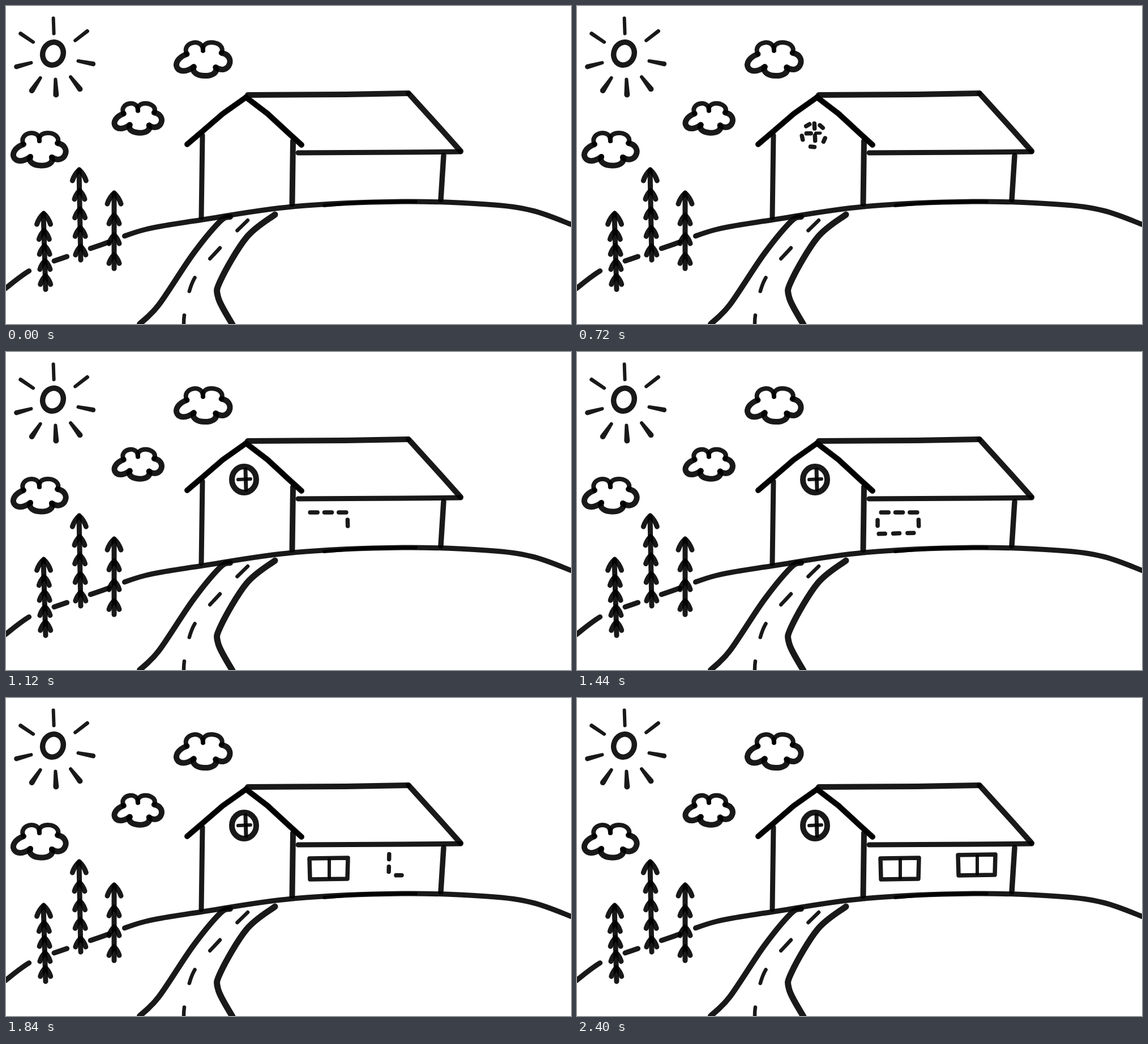
Write an HTML page that moves like this. It is 998 px wide and 561 px high and loops after 2500 ms.

```html
<!DOCTYPE html>
<html lang="en">
<head>
<meta charset="utf-8">
<title>Barn sketch</title>
<style>
  html, body { margin: 0; width: 100%; height: 100%; overflow: hidden; background: #fff; }
  svg { display: block; width: 998px; height: 561px; }
  path, ellipse { fill: none; stroke: #000; stroke-opacity: .9; stroke-linecap: round; stroke-linejoin: round; }
</style>
</head>
<body>
<svg id="stage" viewBox="0 0 998 561"></svg>
<script>
const LOOP = 2500, STEP = 80, LAST = 30, PHASE = 10;
const BOLD = 10, MID = 8.5, FINE = 6.5;
const stage = document.getElementById('stage');

function add(tag, attrs, parent = stage) {
  const el = document.createElementNS('http://www.w3.org/2000/svg', tag);
  for (const k in attrs) el.setAttribute(k, attrs[k]);
  return parent.appendChild(el);
}

const line = (w, d, parent) => add('path', { d, 'stroke-width': w }, parent);

const ring = (w, cx, cy, rx, ry, turn, parent) => add('ellipse',
  { cx, cy, rx, ry, 'stroke-width': w, transform: `rotate(${turn} ${cx} ${cy})` }, parent);

// Smooth stroke through a few points, optionally broken into dashes
function curve(w, text, dashes = 'none') {
  const p = text.split(' ').map(s => s.split(',').map(Number));
  let d = `M${p[0]}`;
  for (let i = 0; i < p.length - 1; i++) {
    const a = p[i - 1] || p[i], b = p[i], c = p[i + 1], e = p[i + 2] || c;
    const c1 = b.map((v, k) => v + (c[k] - a[k]) / 6);
    const c2 = c.map((v, k) => v - (e[k] - b[k]) / 6);
    d += `C${c1} ${c2} ${c}`;
  }
  line(w, d).setAttribute('stroke-dasharray', dashes);
}

function sun() {
  ring(9.5, 83, 84, 18, 20.5, 20);
  for (let i = 0; i < 8; i++) {
    const deg = i * 45 - 92 + 13 * Math.cos((i - 2) * Math.PI / 4);
    const a = deg * Math.PI / 180, reach = 6 * Math.abs(Math.sin(2 * a));
    const r1 = 3, r2 = 4 + Math.sin(a);
    const x1 = 40 + reach, x2 = 67 + reach;
    add('path', {
      d: `M${x1} ${r1}A${r1} ${r1} 0 0 1 ${x1} ${-r1}L${x2} ${-r2}A${r2} ${r2} 0 0 1 ${x2} ${r2}Z`,
      transform: `translate(86 89) rotate(${deg})`,
      style: 'fill:#000;fill-opacity:.9;stroke:none'
    });
  }
}

// Five lobes; each entry is a corner and the depth of the lobe after it
function cloud(x, y, scale) {
  const lobes = [[-28, -9, 17], [0, -15, 16], [32, -11, 20], [22, 14, 15], [-16, 13, 26]];
  lobes.forEach(([ax, ay, depth], i) => {
    const [bx, by] = lobes[(i + 1) % lobes.length];
    const dx = bx - ax, dy = by - ay, h = depth / .75 / Math.hypot(dx, dy);
    const at = (px, py) => `${x + px * scale} ${y + py * scale}`;
    line(i < 2 ? 8 : BOLD, `M${at(ax, ay)}C${at(ax + dy * h - dx * .2, ay - dx * h - dy * .2)} ` +
      `${at(bx + dy * h + dx * .2, by - dx * h + dy * .2)} ${at(bx, by)}`);
  });
}

function tree(x1, top, x2, bottom, rows) {
  line(9, `M${x1} ${top}L${x2} ${bottom}`);
  const first = top + 18, last = bottom - 9;
  for (let i = 0; i < rows; i++) {
    const y = first + (last - first) * i / (rows - 1);
    const x = x1 + (x2 - x1) * (y - top) / (bottom - top);
    const s = i ? 9 : 12, h = i ? 15 : 19;
    line(9, `M${x - s} ${y}Q${x - s * .7} ${y - h * .6} ${x} ${y - h}Q${x + s * .7} ${y - h * .6} ${x + s} ${y}`);
  }
}

sun();
cloud(59, 253, 1);
cloud(348, 94, 1.02);
cloud(233, 198, .9);
tree(66, 367, 70, 500, 5);
tree(129, 290, 132, 448, 5);
tree(191, 331, 191, 463, 4);

// Hill, broken up behind the trees
curve(9, '-2,499 45,465 99,445 169,421 247,394 347,377 506,354 700,345 850,350 930,361 1000,386',
  '53 48 24 44 34 30 2000');
curve(6, '562,352 640,346 724,345');

// Road
curve(BOLD, '396,372 378,380 330,438 270,527 236,561');
curve(11, '475,368 425,408 379,484 375,515 400,562');
curve(FINE, '427,378 375,430 332,482 316,540 314,566', '26 43');

// House
line(BOLD, 'M427 157L600 156L710 154');
line(BOLD, 'M711 154L770 219L803 256');
line(9, 'M516 259L700 258L803 257');
line(9, 'M347 228L345 373');
line(BOLD, 'M507 238L505.5 349');
line(9.5, 'M773 264L768 342');
for (const w of [BOLD, MID]) {
  line(w, 'M320 244L347 221L383 190L424 161');
  line(w, 'M424 161L462 190L501 226L522 245');
}

// n evenly spaced dashes between two points
function dashes(n, len, x1, y1, x2, y2) {
  const size = Math.hypot(x2 - x1, y2 - y1);
  const ux = (x2 - x1) / size, uy = (y2 - y1) / size;
  return Array.from({ length: n }, (_, i) => {
    const mid = size * (i + .5) / n, a = mid - len / 2, b = mid + len / 2;
    return `M${x1 + ux * a} ${y1 + uy * a}L${x1 + ux * b} ${y1 + uy * b}`;
  });
}

function roundDashes(n, len, cx, cy, r, from) {
  return Array.from({ length: n }, (_, i) => {
    const a = from + i * 2 * Math.PI / n;
    const x = cx + r * Math.cos(a), y = cy + r * Math.sin(a);
    const dx = -Math.sin(a) * len / 2, dy = Math.cos(a) * len / 2;
    return `M${x - dx} ${y - dy}L${x + dx} ${y + dy}`;
  });
}

function pane(l, t, r, b, g) {
  const mid = (l + r) / 2 + 1;
  line(7.5, `M${l} ${t + 1}L${r} ${t}L${r - 1} ${b - 1}L${l + 1} ${b}Z`, g);
  line(6, `M${mid} ${t + 3}L${mid} ${b - 3}`, g);
}

// Each window: nine dashes one by one, then the full outline
const windows = [
  {
    marks: [
      ...roundDashes(5, 7, 418, 228, 20.5, -2.1),
      ...dashes(2, 9, 419, 201, 421, 244),
      ...dashes(2, 8, 401, 225, 434, 224)
    ],
    outline(g) {
      ring(BOLD, 420.5, 225, 21.5, 23, 0, g);
      line(7, 'M423 207L424 243', g);
      line(6, 'M410 225L432 224', g);
    }
  },
  {
    marks: [
      ...dashes(3, 13, 531, 283, 607, 283),
      ...dashes(1, 11, 603, 283, 604, 320),
      ...dashes(3, 11, 602, 319, 526, 321),
      ...dashes(1, 10, 531, 320, 531, 283),
      ...dashes(1, 12, 572, 281, 572, 319)
    ],
    outline: g => pane(536, 282, 604, 320, g)
  },
  {
    marks: [
      ...dashes(2, 9, 677, 269, 676, 313),
      ...dashes(2, 10, 679, 313, 739, 312),
      ...dashes(2, 9, 738, 312, 738, 273),
      ...dashes(2, 10, 738, 277, 677, 277),
      ...dashes(1, 12, 704, 277, 704, 312)
    ],
    outline: g => pane(673, 276, 739, 313, g)
  }
];

const parts = [];
windows.forEach(({ marks, outline }, i) => {
  const start = i * PHASE, full = start + PHASE;
  marks.forEach((d, k) => parts.push({ el: line(k < 8 ? 7.5 : 5.5, d), from: start + k + 1, to: full }));
  const el = add('g', {});
  outline(el);
  parts.push({ el, from: full, to: Infinity });
});

function draw(now) {
  const step = Math.min(LAST, Math.floor((now % LOOP) / STEP));
  for (const { el, from, to } of parts) {
    el.style.visibility = step >= from && step < to ? 'visible' : 'hidden';
  }
}

let begin;
function tick(now) {
  begin ??= now;
  draw(now - begin);
  requestAnimationFrame(tick);
}
draw(0);
requestAnimationFrame(tick);
</script>
</body>
</html>
```
